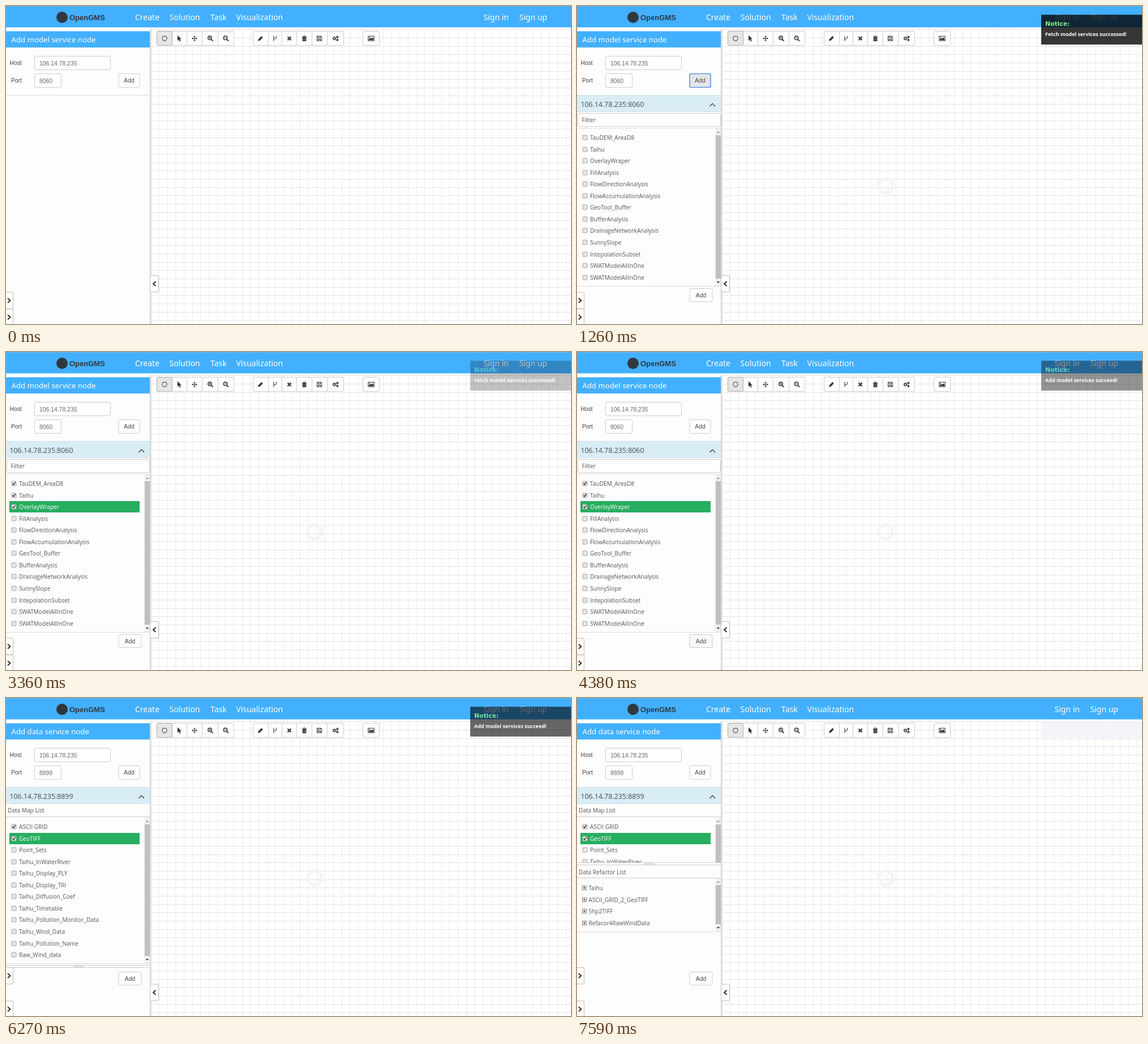
An HTML page that plays this animation: 998x561 px, repeating every 8 s.

```html
<!DOCTYPE html>
<html lang="en">
<head>
<meta charset="utf-8">
<title>Model service panel</title>
<style>
html, body { margin: 0; width: 100%; height: 100%; overflow: hidden; background: #fff; }
svg { display: block; width: 100vw; height: 100vh; }
text { white-space: pre; }
.nav { font: 14px "Noto Sans", "Open Sans", sans-serif; fill: #fff; }
.title { font: 13.2px "Noto Sans", "Open Sans", sans-serif; fill: #fff; }
.form { font: 10.3px "Liberation Sans", Arial, sans-serif; fill: #444; }
.input { font: 10.4px "Liberation Sans", Arial, sans-serif; fill: #666; }
.item { font: 10.15px "Open Sans", "Noto Sans", sans-serif; fill: #555; }
.node { font: 12.35px "Open Sans", "Noto Sans", sans-serif; fill: #4a4a4a; }
.note { font: bold 9px "Noto Sans", "Open Sans", sans-serif; fill: #fff; }
.head { font: bold 10.8px "DejaVu Sans", sans-serif; fill: #86f58a; }
.line { fill: none; stroke: #333; stroke-width: 1.5; }
</style>
</head>
<body>
<svg id="stage" viewBox="0 0 998 561" preserveAspectRatio="none"></svg>
<script>
const LOOP = 8000, ROW = 20.55, CELL = 14.66, BLUE = '#42b0ff';
const CLOSED = -257, DRAG = -181;
const $ = id => document.getElementById(id);

const rect = (x, y, w, h, fill, more = '') =>
  `<rect x="${x}" y="${y}" width="${w}" height="${h}" fill="${fill}" ${more}/>`;
const text = (x, y, cls, s, more = '') =>
  `<text x="${x}" y="${y}" class="${cls}" ${more}>${s}</text>`;
const path = (d, more = 'class="line"') => `<path d="${d}" ${more}/>`;
const group = (id, body, more = '') => `<g id="${id}" ${more}>${body}</g>`;
const box = (x, y, w, h, more = '') =>
  rect(x + .5, y + .5, w - 1, h - 1, '#fff', `stroke="#ccc" rx="2.5" ${more}`);
const rule = (y, x2 = 254, color = '#ddd') => rect(0, y, x2, 1, color);
const solid = 'fill="#333"';

function grid() {
  let across = '', down = '';
  for (let k = 0; k < 36; k++) across += `M256 ${Math.round(41.2 + CELL * k) + .5}H998`;
  for (let k = 1; k < 51; k++) down += `M${Math.floor(256 + CELL * k) + .5} 41V561`;
  return path(down, 'fill="none" stroke="#e6e6e6" stroke-dasharray="3 1"') +
    path(across, 'fill="none" stroke="#dadada" stroke-dasharray="3 1"');
}

function header() {
  const links = [[228, 'Create'], [288.5, 'Solution'], [361, 'Task'], [406.5, 'Visualization'],
    [843.5, 'Sign in'], [906.5, 'Sign up']];
  return rect(0, 0, 998, 37.7, BLUE) + rect(0, 0, 998, 1, '#7fb2d8') +
    '<circle cx="99" cy="20" r="10" fill="#30383f"/>' +
    text(112, 25, 'form', 'OpenGMS', 'style="font-size:13px;font-weight:bold;fill:#30383f"') +
    links.map(([x, s]) => text(x, 25, 'nav', s)).join('');
}

const icon = (x, body) => `<g transform="translate(${x} 57.3)">${body}</g>`;
const stroke = (d, w = 1.4) => path(d, `fill="none" stroke="#333" stroke-width="${w}"`);

function toolbar() {
  const split = xs => xs.map(x => rect(x, 45, 1, 24, '#ccc')).join('');
  const lens = '<circle cx="-1" cy="-1" r="3.3" fill="none" stroke="#333" stroke-width="1.4"/>' +
    stroke('M1.5 1.5L4.5 4.5', 1.9);
  const cog = (x, y, r) => `<circle cx="${x}" cy="${y}" r="${r}" fill="none" stroke="#333" stroke-width="1.5"/>` +
    `<circle cx="${x}" cy="${y}" r="${r + .9}" fill="none" stroke="#333" stroke-dasharray="1 1.1"/>`;
  return box(266, 44, 137, 26) + rect(266.5, 44.5, 27, 25, '#e6e6e6', 'stroke="#adadad" rx="2.5"') +
    split([319, 346, 374]) + box(436, 44, 161, 26) + split([463, 487, 513, 540, 567]) + box(630, 44, 30, 26) +
    icon(280, stroke('M-4 -1Q-4 -4 -1 -4L2 -4Q4 -4 4 -1L4 1L2 4H-2L-4 1Z', 1)) +
    icon(306, path('M-3 -5.5L4 1.3H1L2.6 4.8L.8 5.4L-.7 2L-3 4Z', solid)) +
    icon(333, stroke('M-3 0H3M0 -3V3', 1) +
      path('M-5 0L-2.7 -2V2ZM5 0L2.7 -2V2ZM0 -5L-2 -2.7H2ZM0 5L-2 2.7H2Z', solid)) +
    icon(361, lens + stroke('M-3 -1H1M-1 -3V1', 1)) + icon(388.5, lens + stroke('M-3 -1H1', 1)) +
    icon(449.5, path('M-4.5 4.5L-3.7 1.3L1.8 -4.2L4.2 -1.8L-1.3 3.7Z', solid)) +
    icon(475, stroke('M-2 -4.5V4.5M2.5 -4.5V-2Q2.5 .5 -2 1', 1.1)) +
    icon(500.5, stroke('M-3 -3L3 3M3 -3L-3 3', 2.3)) +
    icon(527, stroke('M-4 -3H4M-1.5 -4.5H1.5', 1.1) +
      path('M-3.3 -2.5H3.3V4.8H-3.3Z', solid) + stroke('M-1.2 -1V3.5M1.2 -1V3.5', .7).replace('#333', '#bbb')) +
    icon(553.5, stroke('M-4 -4H2.5L4 -2.5V4H-4ZM-2 -4V-1.3H1.7V-4M-2 4V1.3H2V4', 1.1)) +
    icon(582, cog(-2, 0, 2) + cog(3.3, -2.6, 1) + cog(3.3, 2.6, 1)) +
    icon(645, stroke('M-5.2 -4H5.2V4H-5.2Z', 1.1) +
      path('M-4 3V1L-2 -1L-.7 .5L2 -2L4 0V3Z', solid) + '<circle cx="-2.6" cy="-1.8" r="1" fill="#333"/>');
}

function rows(id, names, y0) {
  return names.map((s, i) => {
    const r = Math.round(y0 + i * ROW);
    return rect(5.5, r - 10.5, 231, 21, 'none', `id="${id}Bg${i}"`) +
      rect(10, r - 4, 8, 8, '#e6e6e6', 'stroke="#a3a3a3" rx="1"') +
      path(`M11.5 ${r}L13.3 ${r + 2}L16.5 ${r - 2.6}`, `id="${id}Tick${i}" class="line"`) +
      text(23, r + 4, 'item', s, `id="${id}Name${i}"`);
  }).join('');
}

const scrollbar = (top, bottom) =>
  rect(244, top, 10, bottom - top, '#f1f1f1') + rect(245, top + 12, 9, bottom - top - 25, '#c0c0c0') +
  path(`M246.5 ${top + 8}L249.5 ${top + 5}L252.5 ${top + 8}Z`, 'fill="#999"') +
  path(`M246.5 ${bottom - 8}L249.5 ${bottom - 5}L252.5 ${bottom - 8}Z`, 'fill="#444"');

const button = (id, x, y, w, h) =>
  box(x, y, w, h, `id="${id}"`) + text(x + w / 2, Math.round(y + h / 2 + 3.6), 'form', 'Add', 'text-anchor="middle"');

const nodeBar = port => rect(0, 157, 254, 30, '#d9edf7') + rule(157, 254, '#cfe2ea') + rule(186, 254, '#cfdfe6') +
  text(6.5, 178, 'node', '106.14.78.235:' + port) + stroke('M234.5 177L239.3 172L244.1 177', 1.2);

const panel = (id, kind, port, body) => group(id,
  rect(0, 38, 255, 523, '#fdfdfd') + rect(0, 38, 255, 7, '#fff') + rect(254, 41, 2, 520, '#d6d6d6') +
  rect(256, 41, 2, 520, '#f0f0f0') + rect(0, 44.5, 254, 28.7, BLUE) +
  text(9.5, 64, 'title', `Add ${kind} service node`) +
  text(6.5, 104, 'form', 'Host') + box(50, 88, 135, 25) + text(59, 105, 'input', '106.14.78.235') +
  text(9, 135, 'form', 'Port') + box(50, 119, 48, 25) + text(59, 136, 'input', port) +
  button(id + 'Fetch', 198.5, 119, 38, 25) + rule(157) + body);

const models = ['TauDEM_AreaD8', 'Taihu', 'OverlayWraper', 'FillAnalysis', 'FlowDirectionAnalysis',
  'FlowAccumulationAnalysis', 'GeoTool_Buffer', 'BufferAnalysis', 'DrainageNetworkAnalysis', 'SunnySlope',
  'IntepolationSubset', 'SWATModelAllInOne', 'SWATModelAllInOne'];
const maps = ['ASCII GRID', 'GeoTIFF', 'Point_Sets', 'Taihu_InWaterRiver', 'Taihu_Display_PLY',
  'Taihu_Display_TRI', 'Taihu_Diffusion_Coef', 'Taihu_Timetable', 'Taihu_Pollution_Monitor_Data',
  'Taihu_Wind_Data', 'Taihu_Pollution_Name', 'Raw_Wind_data'];
const refactors = ['Taihu', 'ASCII_GRID_2_GeoTIFF', 'Shp2TIFF', 'Refacor4RawWindData'];

const modelBody = group('fetched',
  nodeBar(8060) + box(1, 189, 253, 24) + text(8.5, 205, 'item', 'Filter', 'style="font-size:10.5px"') +
  rule(215) + rows('m', models, 232) + scrollbar(216, 494) + rule(494) + button('modelAdd', 198.5, 498, 41, 24));

// The lower pane is laid out at its final place and shifted by the splitter.
const lower = rect(0, 290, 254, 123, '#fdfdfd') + rule(290, 254, '#ccc') + rect(119, 291, 18, 3, '#e2e2e2') +
  rule(294, 254, '#ccc') + text(3, 311, 'item', 'Data Refactor List') + rule(317, 254, '#ccc') +
  refactors.map((s, i) => {
    const r = Math.round(335 + i * ROW);
    return rect(9.5, r - 3.5, 7, 7, '#fff', 'stroke="#777"') + stroke(`M11 ${r}H15M13 ${r - 2}V${r + 2}`, 1) +
      text(20.5, r + 4, 'item', s);
  }).join('') + scrollbar(318, 412) + rule(412);

const dataBody = nodeBar(8899) + text(3, 202, 'item', 'Data Map List') + rule(209, 254, '#ccc') +
  group('upper', rows('d', maps, 227) + scrollbar(211, 468) + rule(468), 'clip-path="url(#upperClip)"') +
  group('lowerView', group('lower', lower), 'clip-path="url(#lowerClip)"') + button('dataAdd', 198.5, 483, 41, 24);

const tab = (id, y) => group(id, rect(254.5, y + .5, 15, 29, '#fff', 'stroke="#bbb" rx="1.5"') +
  path('', `id="${id}Mark" fill="none" stroke="#222" stroke-width="1.8"`));

$('stage').innerHTML =
  '<defs><clipPath id="upperClip"><rect id="upperBox" x="0" y="205" width="255" height="266"/></clipPath>' +
  '<clipPath id="lowerClip"><rect x="0" y="205" width="255" height="272"/></clipPath></defs>' +
  rect(0, 0, 998, 561, '#fff') + grid() +
  group('spinner', '<circle r="12.5" fill="none" stroke="#f3f3f6" stroke-width="5" stroke-dasharray="8.8 1"/>') +
  rect(820, 41, 178, 29, '#f3f2fb', 'id="trace" opacity=".8"') + toolbar() +
  panel('model', 'model', 8060, modelBody) + panel('data', 'data', 8899, dataBody) + header() +
  tab('modelTab', 475) + tab('dataTab', 504.5) + tab('thirdTab', 534) +
  group('notice', rect(820, 15.4, 178, 52.6, '#000', 'opacity=".8"') +
    text(827, 35, 'head', 'Notice:') + text(827, 53, 'note', '', 'id="message"'));

const progress = (t, a, b) => Math.min(1, Math.max(0, (t - a) / (b - a)));
const ease = (t, a, b) => .5 - Math.cos(progress(t, a, b) * Math.PI) / 2;
const show = (id, on) => $(id).setAttribute('visibility', on ? 'inherit' : 'hidden');
const shift = (id, x, y = 0) => $(id).setAttribute('transform', `translate(${x} ${y})`);

// Each step: time, ticked rows, selected row, hovered row.
const modelSteps = [[0, 0, -1, -1], [2580, 0, -1, 1], [2640, 0, -1, 0], [2790, 1, 0, -1], [2910, 1, 0, 1],
  [3000, 2, 1, -1], [3120, 2, 1, 2], [3210, 3, 2, -1]];
const dataSteps = [[0, 0, -1, -1], [5640, 0, -1, 0], [5730, 1, 0, -1], [5940, 1, 0, 1], [6060, 2, 1, -1]];

function paintRows(id, count, steps, t) {
  const [, ticked, selected, hover] = steps.filter(s => s[0] <= t).pop();
  for (let i = 0; i < count; i++) {
    const bg = $(id + 'Bg' + i);
    bg.setAttribute('fill', i === selected ? '#27ae60' : 'none');
    bg.setAttribute('stroke', i === hover ? '#d4d4d4' : i === selected ? '#fdfdfd' : 'none');
    $(id + 'Name' + i).style.fill = i === selected ? '#fff' : '';
    show(id + 'Tick' + i, i < ticked);
  }
}

function placeTab(id, y, x) {
  shift(id, x);
  const d = x > CLOSED / 2 ? 1 : -1;
  $(id + 'Mark').setAttribute('d', `M${262.2 + 2.2 * d} ${y - 4}L${262.2 - 2.2 * d} ${y}L${262.2 + 2.2 * d} ${y + 4}`);
}

function press(id, on) {
  $(id).setAttribute('fill', on ? '#e6e6e6' : '#fff');
  $(id).setAttribute('stroke', on ? '#5b93e6' : '#ccc');
  $(id).setAttribute('stroke-width', on ? 1.6 : 1);
}

function update(t) {
  press('modelFetch', t >= 750 && t < 2580);
  show('fetched', t >= 900);
  show('spinner', t >= 750);
  const busy = (t >= 750 && t < 960) || (t >= 4110 && t < 4260);
  $('spinner').setAttribute('transform', `translate(545.5 317.5) rotate(${busy ? t * .4 : 0})`);

  paintRows('m', models.length, modelSteps, t);
  paintRows('d', maps.length, dataSteps, t);
  $('modelAdd').setAttribute('fill', t >= 4080 && t < 4770 ? '#f8f8f8' : '#fff');

  const dataX = CLOSED * (1 - ease(t, 4860, 5040));
  const modelX = CLOSED * ease(t, 5010, 5070);
  shift('data', dataX);
  show('data', t >= 4860);
  shift('model', modelX);
  placeTab('modelTab', 490, modelX);
  placeTab('dataTab', 519.5, dataX);
  placeTab('thirdTab', 549, CLOSED);

  const split = DRAG * ease(t, 7050, 7590);
  shift('lower', 0, split - DRAG);
  $('upperBox').setAttribute('height', 266 + split);

  const first = ease(t, 990, 1290) * (1 - ease(t, 3000, 3570));
  const second = ease(t, 4220, 4530) * (1 - ease(t, 6060, 6690));
  $('notice').setAttribute('opacity', t < 3800 ? first : second);
  $('message').textContent = t < 3800 ? 'Fetch model services successed!' : 'Add model services succeed!';
  show('trace', t >= 6690);
}

const start = performance.now();
function tick() {
  update((performance.now() - start) % LOOP);
  requestAnimationFrame(tick);
}
tick();
</script>
</body>
</html>
```
